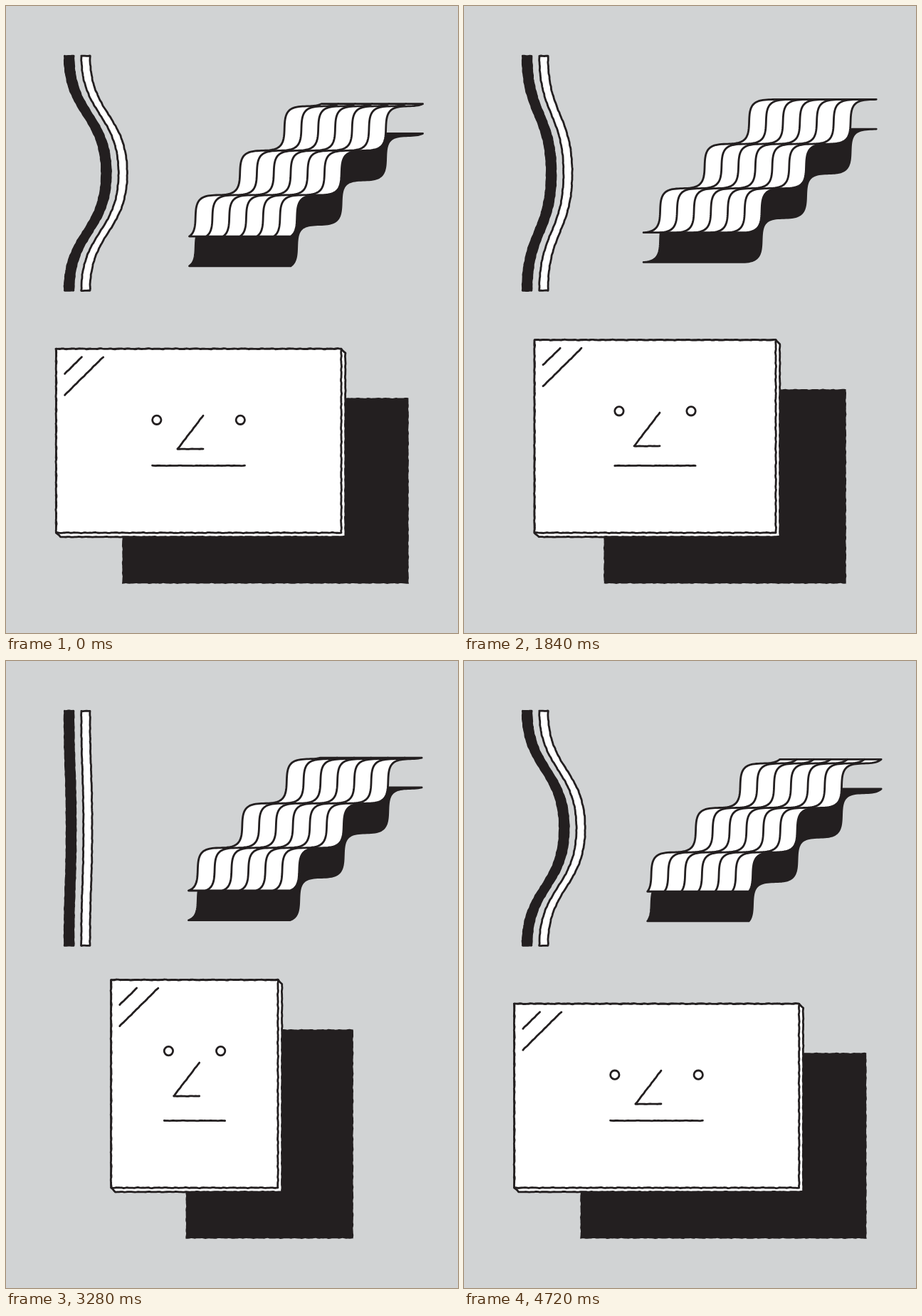
Write an HTML page with a canvas that moves like this. It is 635 px wide and 882 px high and loops after 4.8 s.

```html
<!DOCTYPE html>
<html lang="en">
<head>
<meta charset="utf-8">
<title>Shapes</title>
<style>
  html, body { margin: 0; width: 100%; height: 100%; overflow: hidden; background: #d1d3d4; }
  canvas { display: block; width: 635px; height: 882px; }
</style>
</head>
<body>
<canvas id="stage"></canvas>
<script>
const W = 635, H = 882, LOOP = 4800, STEP = 80;
const GREY = '#d1d3d4', INK = '#231f20', WHITE = '#fff';
const canvas = document.getElementById('stage');
const ctx = canvas.getContext('2d');
const dpr = window.devicePixelRatio || 1;
canvas.width = W * dpr;
canvas.height = H * dpr;

// cubic-bezier(.8, 0, .2, 1)
function ease(x) {
  let lo = 0, hi = 1, s = 0.5;
  for (let i = 0; i < 24; i++) {
    s = (lo + hi) / 2;
    const r = 1 - s;
    if (2.4 * r * r * s + 0.6 * r * s * s + s * s * s < x) lo = s; else hi = s;
  }
  return s * s * (3 - 2 * s);
}

// 0 = wide and bent, 1 = narrow and straight
function swing(t) {
  const x = (t % 2400) / 1200;
  return x < 1 ? ease(x) : 1 - ease(x - 1);
}

const noise = s => 0.28 * Math.sin(s * 0.47) + 0.2 * Math.sin(s * 0.83 + 2) + 0.15 * Math.sin(s * 0.19 + 1);

// hand-inked version of a polyline
function rough(pts, amp = 1) {
  const out = [];
  let run = pts[0][0] * 0.7 + pts.length;
  for (let i = 1; i < pts.length; i++) {
    const [x0, y0] = pts[i - 1], [x1, y1] = pts[i];
    const dx = x1 - x0, dy = y1 - y0, len = Math.hypot(dx, dy);
    if (!len) continue;
    const n = Math.max(1, Math.round(len / 2.5));
    for (let j = 0; j <= n; j++) {
      const f = j / n, d = noise(run + f * len) * amp;
      out.push([x0 + dx * f - dy / len * d, y0 + dy * f + dx / len * d]);
    }
    run += len;
  }
  return out;
}

function draw(pts, fill, stroke = INK, closed = true) {
  ctx.beginPath();
  pts.forEach(([x, y]) => ctx.lineTo(x, y));
  if (closed) ctx.closePath();
  if (fill) { ctx.fillStyle = fill; ctx.fill(); }
  if (stroke) { ctx.strokeStyle = stroke; ctx.stroke(); }
}

const box = (l, t, r, b) => [[l, t], [r, t], [r, b], [l, b], [l, t]];
const line = (...pts) => draw(rough(pts, 0.5), null, INK, false);

function bars(q) {
  const bend = 52.3 * (1 - q), N = 40, top = 70.3, half = 165;
  const side = x0 => {
    const pts = [];
    for (let i = -N; i <= N; i++) {
      const s = 1 - Math.abs(i) / N, r = 1 - s;
      const y = half * (1.5 * s * r * r + 1.5 * s * s * r + s * s * s);
      pts.push([x0 + bend * s * s * (3 - 2 * s), i < 0 ? top + y : top + 2 * half - y]);
    }
    return pts;
  };
  const bar = (l, r, fill) => {
    const left = side(l);
    draw(rough([...left, ...side(r).reverse(), left[0]], 0.7), fill);
  };
  bar(82.3, 94.9, INK);
  bar(105.8, 118, WHITE);
}

function stairs(t) {
  const PERIOD = 62.5, LEN = 186, AMP = 9.3, STRIPS = 6, GAP = 23.75, DROP = 41.7;
  const k = 2 * Math.PI / PERIOD;
  const phase = 2 * Math.PI * t / 1600 + 0.22;
  const curve = [];
  for (let u = 0; u <= LEN; u += 1.5) {
    const w = AMP * Math.cos(phase - k * u);
    curve.push([248.4 + u + w, 315 - u + w]);
  }
  const shift = (dx, dy) => curve.map(([x, y]) => [x + dx, y + dy]);
  const band = dy => [...shift(0, dy), ...shift(STRIPS * GAP, dy).reverse()];
  draw(band(DROP), INK);
  draw(band(0), WHITE);
  for (let i = 1; i < STRIPS; i++) draw(shift(i * GAP, 0), null, INK, false);
}

function face(q) {
  const mix = (a, b) => a + (b - a) * q;
  const l = mix(70.5, 152.3), r = mix(471, 376.7), t = mix(482.3, 446.6), b = 741;

  draw(rough(box(mix(163.3, 258), mix(551.4, 516.3), mix(565.6, 483.2), 812.4)), INK, null);
  draw(rough([[l, t], [r, t], [r + 5.7, t + 6], [r + 5.7, b + 5.8], [l + 6, b + 5.8], [l, b], [l, t]], 0.7), WHITE);
  draw(rough(box(l, t, r, b)), WHITE);

  line([l + 12, t + 35], [l + 36, t + 11.5]);
  line([l + 12, t + 65], [l + 66, t + 11.5]);

  for (const x of [mix(211.8, 229.4), mix(329.3, 300)]) {
    ctx.beginPath();
    ctx.arc(x, t + 100, 6.2, 0, 2 * Math.PI);
    ctx.stroke();
  }
  const nx = mix(241, 235.3), ny = mix(623.2, 611.4);
  line([nx + 36, ny - 47], [nx, ny], [nx + 36, ny]);
  line([mix(205.5, 223.3), 646.6], [mix(335.5, 306), 646.6]);
}

function render(t) {
  ctx.setTransform(dpr, 0, 0, dpr, 0, 0);
  ctx.fillStyle = GREY;
  ctx.fillRect(0, 0, W, H);
  ctx.lineWidth = 2.8;
  ctx.lineJoin = ctx.lineCap = 'round';
  const q = swing(t);
  bars(q);
  stairs(t);
  face(q);
}

const start = performance.now();
function tick() {
  const t = Math.max(0, performance.now() - start) % LOOP;
  render(Math.floor(t / STEP) * STEP);
  requestAnimationFrame(tick);
}
tick();
</script>
</body>
</html>
```
